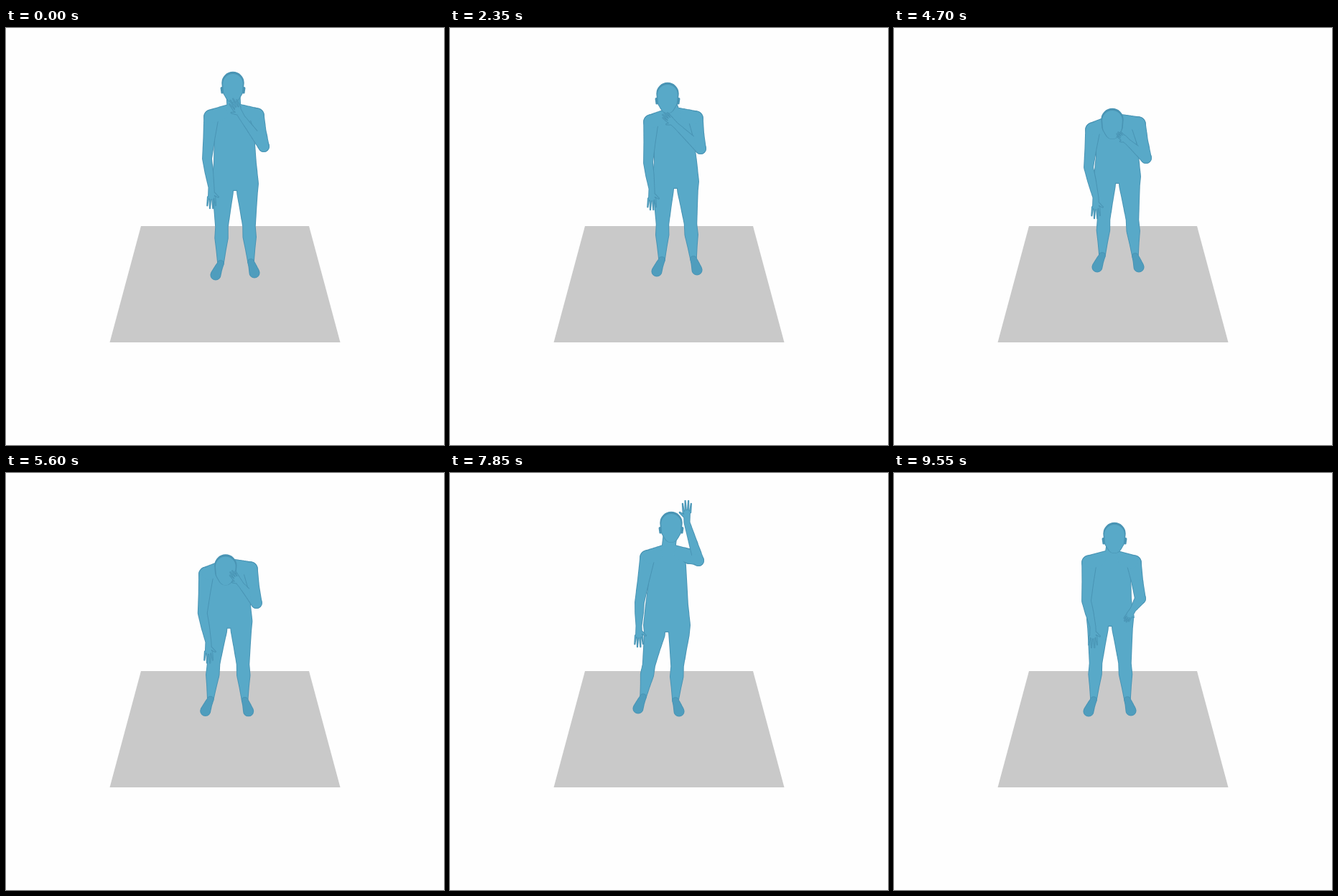
An HTML page with a canvas for the animation above (9600 ms loop, 610 by 581 pixels).

```html
<!DOCTYPE html>
<html lang="en">
<head>
<meta charset="utf-8">
<title>Figure on a floor</title>
<style>
  html, body { margin: 0; width: 100%; height: 100%; overflow: hidden; background: #fefefe; }
  canvas { display: block; }
</style>
</head>
<body>
<canvas id="stage" width="610" height="581"></canvas>
<script>
const ctx = document.getElementById('stage').getContext('2d');
const LOOP = 9600, STEP = 50;
const MAIN = '#58a9c8', EDGE = '#4994b4', FOOT = '#4f9dbd';

// Pose times, with the bias of the easing that leads into the next pose.
const times = [0, 1300, 2350, 4700, 6450, 7850, 9550];
const bias = [1, 1, 1, 1.5, .6, 1];

// Joint positions: x, y for each pose. L and R are the viewer's left and right.
const trunk = {
  head: [316,82, 311,118, 303,97, 304,133, 310,138, 308,75, 307,90],
  shoulderL: [286,124, 288,130, 280,131, 277,142, 283,140, 275,118, 272,125],
  shoulderR: [349,122, 349,125, 342,126, 340,134, 340,134, 333,116, 334,125],
  crotch: [319,227, 320,224, 314,224, 311,217, 309,216, 302,222, 301,214],
  ankleL: [299,328, 295,324, 295,323, 290,317, 273,312, 269,312, 278,316],
  ankleR: [341,326, 343,323, 339,322, 336,318, 325,314, 314,317, 325,316]
};
const arms = {
  elbowL: [280,182, 283,190, 276,188, 271,194, 280,198, 264,180, 268,178],
  wristL: [286,222, 289,229, 281,224, 281,236, 284,234, 263,213, 277,214],
  elbowR: [359,165, 357,175, 349,168, 351,181, 344,181, 346,122, 343,175],
  wristR: [329,125, 337,144, 315,136, 326,159, 332,150, 330,69, 333,190],
  tipR: [314,99, 328,122, 297,119, 311,146, 319,116, 330,38, 322,207]
};
const tracks = { ...trunk, ...arms };

const lerp = (a, b, u) => a + (b - a) * u;
const mix = (a, b, u) => [lerp(a[0], b[0], u), lerp(a[1], b[1], u)];
const shift = (p, dx, dy) => [p[0] + dx, p[1] + dy];
const ball = (p, r) => [p[0], p[1], r];

function poseAt(t) {
  let i = 0;
  while (i < times.length - 2 && t >= times[i + 1]) i++;
  let u = Math.min(1, (t - times[i]) / (times[i + 1] - times[i])) ** bias[i];
  u = u * u * (3 - 2 * u);
  const pose = {};
  for (const name in tracks) {
    const k = tracks[name];
    pose[name] = mix(k.slice(2 * i, 2 * i + 2), k.slice(2 * i + 2, 2 * i + 4), u);
  }
  return pose;
}

// Sweeps a circle of changing radius along a chain of [x, y, r].
function sweep(path, chain, inset, dy) {
  for (let i = 1; i < chain.length; i++) {
    const a = chain[i - 1], b = chain[i];
    const n = Math.ceil(Math.hypot(b[0] - a[0], b[1] - a[1])) || 1;
    for (let j = 0; j <= n; j++) {
      const [x, y] = mix(a, b, j / n);
      const r = Math.max(.4, lerp(a[2], b[2], j / n) - inset);
      path.moveTo(x + r, y + dy);
      path.arc(x, y + dy, r, 0, 7);
    }
  }
}

function paint(chains, color, inset = 0, dy = 0) {
  const path = new Path2D();
  chains.forEach(chain => sweep(path, chain, inset, dy));
  ctx.fillStyle = color;
  ctx.fill(path);
}

function rimmed(chains, rim = 1, dy = 0, color = MAIN) {
  paint(chains, EDGE);
  paint(chains, color, rim, dy);
}

function hand(wrist, tip, thumbSide) {
  const dx = tip[0] - wrist[0], dy = tip[1] - wrist[1];
  const point = (length, angle) => {
    const c = Math.cos(angle) * length, s = Math.sin(angle) * length;
    return shift(wrist, dx * c - dy * s, dx * s + dy * c);
  };
  const chains = [[ball(wrist, 4.5), ball(point(.42, 0), 5)]];
  [-.23, -.08, .07, .22].forEach((angle, i) =>
    chains.push([ball(point(.48, angle * 1.4), 1.8), ball(point(i % 3 ? .97 : .86, angle), 1.2)]));
  chains.push([ball(point(.2, 0), 3), ball(point(.55, .62 * thumbSide), 1.4)]);
  return chains;
}

function leg(hip, ankle) {
  const knee = mix(hip, ankle, .5);
  return [ball(shift(hip, 0, -10), 16), ball(shift(hip, 0, 2), 14.8),
    ball(mix(hip, knee, .5), 12), ball(knee, 9.3),
    ball(mix(knee, ankle, .3), 9.8), ball(mix(knee, ankle, .62), 7.3), ball(ankle, 4.8)];
}

const upperArm = (shoulder, elbow, r) =>
  [ball(shoulder, 10.8), ball(mix(shoulder, elbow, .5), 8.6), ball(elbow, r)];
const forearm = (elbow, wrist, r) =>
  [ball(elbow, r), ball(mix(elbow, wrist, .45), 6.4), ball(wrist, 4.5)];

function drawFigure(p) {
  const nape = shift(mix(p.shoulderL, p.shoulderR, .5), 0, -9);
  const hipL = shift(p.crotch, -17, 0), hipR = shift(p.crotch, 17, 0);
  const flank = (shoulder, hip, side) => [
    ball(shift(shoulder, 18 * side, 13), 14),
    ball(shift(hip, side, -38), 14), ball(shift(hip, 0, -10), 16)];

  rimmed([
    leg(hipL, p.ankleL), leg(hipR, p.ankleR),
    flank(p.shoulderL, hipL, 1), flank(p.shoulderR, hipR, -1),
    [ball(nape, 10), ball(shift(p.crotch, 0, -12), 12)],
    [ball(p.shoulderL, 10.8), ball(nape, 10), ball(p.shoulderR, 10.8)],
    [ball(p.head, 10), ball(nape, 10)]
  ]);
  [[p.ankleL, -7, 16], [p.ankleR, 5, 15]].forEach(([ankle, dx, dy]) =>
    rimmed([[ball(ankle, 4.8), ball(shift(ankle, dx * .5, dy * .45), 6),
      ball(shift(ankle, dx, dy), 7.6)]], 1, 0, FOOT));

  rimmed([upperArm(p.shoulderL, p.elbowL, 7), forearm(p.elbowL, p.wristL, 7),
    ...hand(p.wristL, shift(p.wristL, 0, 30), -1)]);
  rimmed([upperArm(p.shoulderR, p.elbowR, 8)]);
  // Blend the arms into the chest.
  paint([p.shoulderL, p.shoulderR].map(s =>
    [ball(mix(s, nape, .1), 9), ball(mix(s, nape, .45), 8.5)]), MAIN);

  const raised = Math.max(0, Math.min(1, (nape[1] - p.head[1]) / 20));
  const skull = [ball(shift(p.head, 0, -5.5), 15.7), ball(shift(p.head, 0, 3), 15),
    ball(shift(p.head, 0, 11), 11)];
  if (raised) paint([-15.5, 15.5].map(x =>
    [ball(shift(p.head, x, 2), 2 * raised), ball(shift(p.head, x * .97, 8), 1.6 * raised)]), EDGE);
  rimmed([skull], 1.8, 1.4);

  rimmed([forearm(p.elbowR, p.wristR, 8), ...hand(p.wristR, p.tipR, -1)]);
  paint([[ball(mix(p.shoulderR, p.elbowR, .6), 6.5), ball(p.elbowR, 6.8)]], MAIN);
}

function frame(now) {
  const t = Math.floor(now % LOOP / STEP) * STEP;
  ctx.fillStyle = '#fefefe';
  ctx.fillRect(0, 0, 610, 581);
  ctx.fillStyle = '#c9c9c9';
  ctx.fill(new Path2D('M188 276H422L465.500 438H144.500Z'));
  drawFigure(poseAt(t));
  requestAnimationFrame(frame);
}
frame(performance.now());
</script>
</body>
</html>
```
